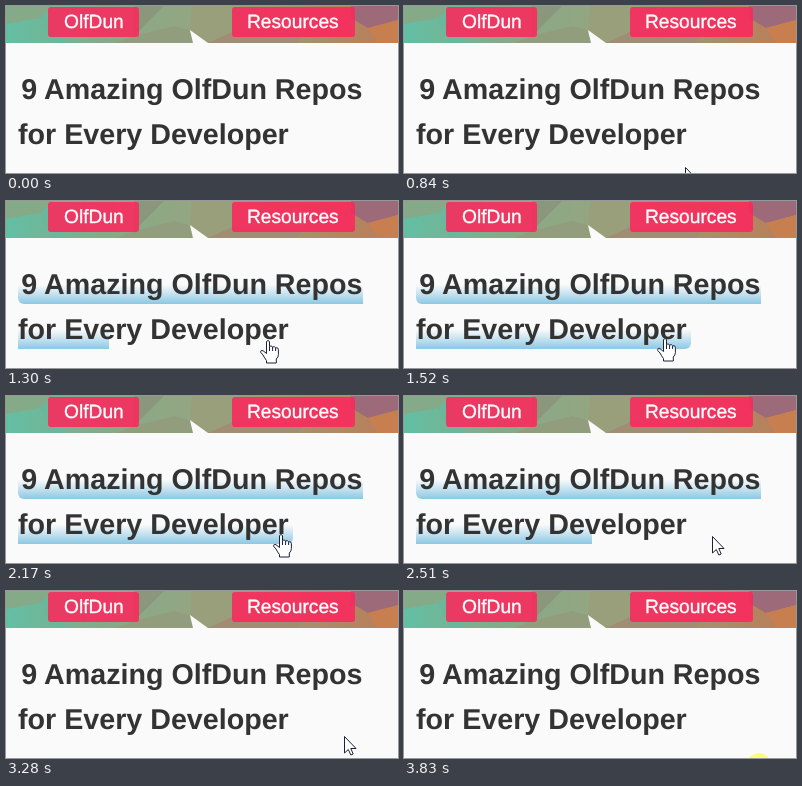
Animation of 392x167 px, one loop 4040 ms. Source, as an HTML page with a canvas:

```html
<!DOCTYPE html>
<html lang="en">
<head>
<meta charset="utf-8">
<title>Heading hover</title>
<style>
  html, body { margin: 0; width: 100%; height: 100%; overflow: hidden; background: #fafafa; }
  canvas { display: block; }
</style>
</head>
<body>
<canvas id="stage" width="392" height="167"></canvas>
<script>
const ctx = document.getElementById('stage').getContext('2d');
const W = 392, H = 167, LOOP = 4040;
const FONT = '"Liberation Sans", Arial, sans-serif';
ctx.textRendering = 'geometricPrecision';

// Highlighted lines: left, right, text x, baseline
const LINES = [
  { text: '9 Amazing OlfDun Repos', left: 12, right: 357, x: 15.2, base: 93, radii: [6, 0, 0, 6] },
  { text: 'for Every Developer', left: 12, right: 287, x: 12, base: 138, radii: [0, 6, 6, 0] }
];
const HOVER_IN = 1134, HOVER_OUT = 2445, FADE = 400;

// The picture changes only at these times: time, pointer kind, tip x, tip y
const STEPS = [
  [0], [760, 'arrow', 281, 161], [870, 'arrow', 279, 158], [970, 'arrow', 274, 154],
  [1080, 'arrow', 268, 150], [1180, 'hand', 260, 139], [1300, 'hand', 260, 139],
  [1410, 'hand', 259, 137], [1520, 'hand', 259, 137], [2170, 'hand', 273, 138],
  [2280, 'hand', 278, 138], [2390, 'hand', 284, 139], [2500, 'arrow', 308, 140],
  [2610, 'arrow', 332, 141], [2730, 'arrow', 334, 141], [2830, 'arrow', 334, 141],
  [3280, 'arrow', 338, 145], [3390, 'arrow', 347, 157], [3490], [3830, 'click', 355, 174]
];

// CSS "ease": cubic-bezier(.25, .1, .25, 1)
function ease(p) {
  if (p <= 0) return 0;
  if (p >= 1) return 1;
  const curve = (a, b, s) => 3 * a * s * (1 - s) ** 2 + 3 * b * s * s * (1 - s) + s ** 3;
  let lo = 0, hi = 1;
  for (let i = 0; i < 24; i++) {
    const mid = (lo + hi) / 2;
    if (curve(.25, .25, mid) < p) lo = mid; else hi = mid;
  }
  return curve(.1, 1, lo);
}

function gradient(x, y, colors) {
  const g = ctx.createLinearGradient(0, 0, x, y);
  colors.forEach((c, i) => g.addColorStop(i / (colors.length - 1), c));
  return g;
}

function poly(color, ...pts) {
  ctx.beginPath();
  for (let i = 0; i < pts.length; i += 2) ctx.lineTo(pts[i], pts[i + 1]);
  ctx.closePath();
  ctx.fillStyle = color;
  ctx.fill();
}

function label(text, x, y, size, color, weight = '') {
  ctx.font = `${weight} ${size}px ${FONT}`;
  ctx.fillStyle = color;
  ctx.fillText(text, x, y);
}

function badge(text, x, w, tx) {
  ctx.beginPath();
  ctx.roundRect(x, 1, w, 30, 3);
  ctx.fillStyle = 'rgba(252,40,92,.87)';
  ctx.fill();
  label(text, tx, 22, 19.2, '#fff');
  ctx.strokeStyle = '#fff';
  ctx.lineWidth = .35;
  ctx.strokeText(text, tx, 22);
}

function header() {
  ctx.save();
  ctx.beginPath();
  ctx.rect(0, 0, W, 37);
  ctx.clip();
  ctx.fillStyle = gradient(W, 0, ['#62bfa4', '#86aa88', '#95a581', '#a5906f', '#bd7c55']);
  ctx.fillRect(0, 0, W, 37);
  poly('#85aa88', 0, 0, 48, 0, 34, 12, 0, 18);
  poly('#6bb79c', 34, 12, 48, 0, 60, 37, 46, 37);
  poly('#8a977c', 128, 0, 158, 0, 128, 30);
  poly('#929d7d', 128, 30, 168, 20, 183, 24, 187, 37, 110, 37);
  poly('#9a9f7b', 186, 0, 240, 0, 240, 37, 202, 37, 184, 24);
  poly('#a08d74', 202, 37, 226, 26, 300, 28, 290, 37);
  poly('#9c6a78', 345, 0, 392, 0, 392, 14, 362, 22, 345, 12);
  poly('#c77f50', 362, 22, 392, 14, 392, 37, 372, 37);
  poly('#fafafa', 184, 24, 202, 37, 187, 37);
  ctx.restore();
}

function highlight(amount) {
  let left = amount * LINES.reduce((sum, l) => sum + l.right - l.left, 0);
  for (const l of LINES) {
    const width = l.right - l.left, shown = Math.min(width, left);
    left -= shown;
    if (shown <= 0) continue;
    const top = l.base - 29, height = 39;
    ctx.save();
    ctx.translate(l.left, top);
    ctx.beginPath();
    ctx.roundRect(0, 0, width, height, l.radii);
    ctx.clip();
    const clear = 'rgba(140,200,228,0)';
    ctx.fillStyle = gradient(0, height, [clear, clear, 'rgb(140,200,228)']);
    ctx.fillRect(0, 0, Math.round(shown), height);
    ctx.restore();
  }
}

const SHAPES = {
  arrow: new Path2D('M.5 .5V17L4.3 13.5L6.8 19L9.2 18L6.8 12.5H12Z'),
  hand: new Path2D('M.5 1.5Q2 -.5 3.5 1.5V6.5Q5 5 6.7 7Q8.2 5.8 9.7 7.8Q12.4 7 12.4 9.8' +
    'V14.5Q12.4 17 10.3 19V23H.5V20.5Q-1.5 18 -3 15L-5.5 12.2Q-5.3 9.5 -3 10.7L.5 13.5Z')
};

function pointer(kind, x, y) {
  if (kind === 'click') {
    ctx.beginPath();
    ctx.arc(x, y, 12, 0, Math.PI * 2);
    ctx.fillStyle = '#fdfd7d';
    ctx.fill();
    return;
  }
  ctx.save();
  ctx.translate(x, y);
  ctx.fillStyle = '#fff';
  ctx.strokeStyle = '#1b2238';
  ctx.lineWidth = 1;
  ctx.lineJoin = 'round';
  ctx.fill(SHAPES[kind]);
  ctx.stroke(SHAPES[kind]);
  if (kind === 'hand') ctx.stroke(new Path2D('M3.5 6.5V11M6.6 7V11M9.6 8V11'));
  ctx.restore();
}

function draw(now) {
  const t = now % LOOP;
  const [time, kind, x, y] = STEPS.findLast(s => s[0] <= t);
  ctx.fillStyle = '#fafafa';
  ctx.fillRect(0, 0, W, H);
  header();
  badge('OlfDun', 42, 91, 58);
  badge('Resources', 226, 123, 241);
  highlight(ease((time - HOVER_IN) / FADE) - ease((time - HOVER_OUT) / FADE));
  for (const l of LINES) label(l.text, l.x, l.base, 28.67, '#333', 'bold');
  if (kind) pointer(kind, x, y);
}

const start = performance.now();
function tick() {
  draw(performance.now() - start);
  requestAnimationFrame(tick);
}
tick();
</script>
</body>
</html>
```
